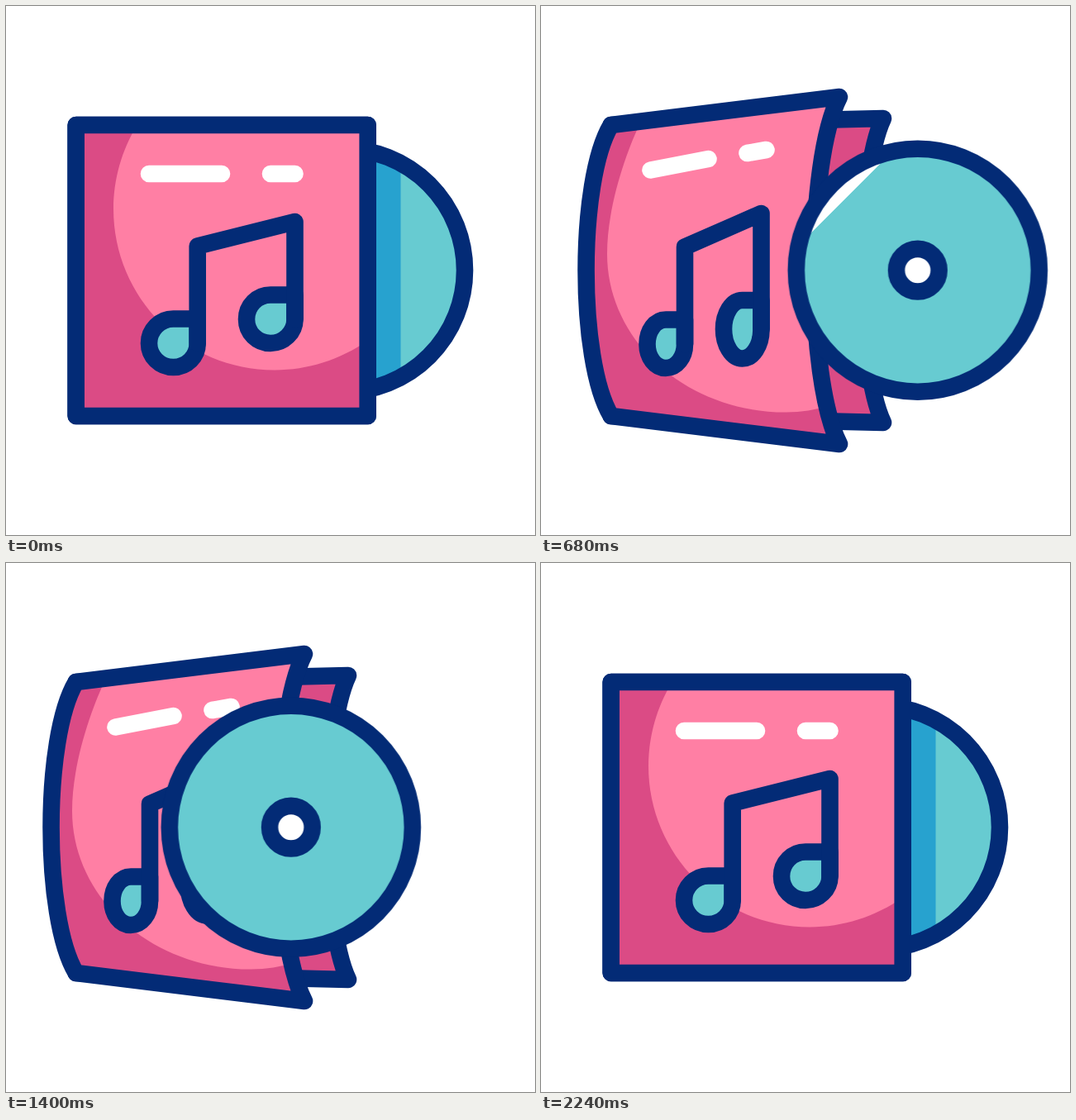
Recreate the animation shown at these times as an HTML page without scripts. Size 640 by 640 pixels, loop 2.4 s.

```html
<!DOCTYPE html>
<html lang="en">
<head>
<meta charset="utf-8">
<title>Album sleeve and disc</title>
<style>
  html, body { margin: 0; height: 100%; overflow: hidden; background: #fff; }
  svg { display: block; width: 100vw; height: 100vh; }

  .line { stroke: #032b76; stroke-width: 20.6; stroke-linecap: round; stroke-linejoin: round; }
  .dark { fill: #db4b85; }
  .light { fill: #ff7fa4; }
  .teal { fill: #67cbd1; }
  .shade { fill: #27a2cf; }
  .white { fill: #fff; }
  .bare { fill: none; }
  .bars { stroke: #fff; }

  .anim { animation: 2400ms cubic-bezier(.333, 0, .667, 1) infinite; }
  .back { animation-name: back; }
  .front { animation-name: front; }
  .glow { animation-name: glow; }
  .bars { animation-name: bars; }
  .stems { animation-name: stems; }
  .heads { animation-name: heads; }
  .disc { animation-name: disc; }
  .shade { animation-name: shade; }
  .shine { animation-name: shine; }
  .inside { animation: inside 2400ms step-end infinite; }
  .outside { animation: outside 2400ms step-end infinite; }

  /* Sleeve: flat, then bent open */
  @keyframes back {
    0%, 92.08%, to { d: path("M84.7 144L437.7 144C437.7 211 437.7 429 437.7 496L84.7 496Z"); }
    23.33%, 70% { d: path("M84.7 144L414 136C381 206 381 434 414 504L84.7 496Z"); }
  }
  @keyframes front {
    0%, 92.08%, to { d: path("M84.7 144L437.7 144C437.7 211 437.7 429 437.7 496L84.7 496C84.7 429 84.7 211 84.7 144Z"); }
    23.33%, 70% { d: path("M84.7 144L361 110C320.3 190 320.3 450 361 530L84.7 496C44.5 429 44.5 211 84.7 144Z"); }
  }
  @keyframes glow {
    0%, 92.08%, to { d: path("M158.5 144C140 174.6 130 209.7 130 245.5C130 353 217 440.5 325 440.5C365 440.5 404.6 428 437.5 404.8C437.5 330 437.5 200 437.5 144Z"); }
    23.33%, 70% { d: path("M121 139.5C105 172 80 240 80 300C80 406 177 491.5 296 491.5C315 491.5 333 488.5 346 484C325 400 322 190 361 110Z"); }
  }
  @keyframes bars {
    0%, 92.08%, to { d: path("M173 203L261 203M320 203L349.5 203"); }
    23.33%, 70% { d: path("M132.5 198.5L202.5 185M249.5 178L272.5 174"); }
  }
  @keyframes stems {
    0%, 92.08%, to { d: path("M231.7 408L231.7 290.5L349.5 261L349.5 379"); }
    23.33%, 70% { d: path("M174 409L174 291.5L266.5 251L266.5 391"); }
  }
  @keyframes heads {
    0%, 92.08%, to { d: path("M231.7 378.5H202.5C186 378.5 173 392 173 408S186 437 202.5 437S231.7 424 231.7 408ZM349.5 349.5H320C304 349.5 291 362.5 291 379S304 408 320 408S349.5 395 349.5 379Z"); }
    23.33%, 70% { d: path("M174 379.5H151C138 379.5 128.5 393 128.5 409S138 438 151 438S174 425 174 409ZM266.5 356H243.5C231 356 221 372 221 391S231 426.5 243.5 426.5S266.5 411 266.5 391Z"); }
  }

  /* Disc slides out, crosses in front, and returns */
  @keyframes disc {
    0%, 4.38%, 93.33%, to { transform: translateX(408px); }
    23.54%, 72.5% { transform: translateX(477.5px); }
    42.5%, 57.42% { transform: translateX(343.2px); }
  }
  @keyframes shade {
    0%, 5.42%, 92.08%, to { transform: translateX(477.5px); }
    23.54%, 70% { transform: translateX(343.5px); }
  }
  @keyframes shine {
    0%, 23.33% { transform: translateX(-267px); }
    50%, to { transform: translateX(148px); }
  }
  @keyframes inside {
    0%, 72.5% { visibility: visible; }
    23.54% { visibility: hidden; }
  }
  @keyframes outside {
    0%, 72.5% { visibility: hidden; }
    23.54% { visibility: visible; }
  }
</style>
</head>
<body>
<svg viewBox="0 0 640 640">
  <defs>
    <clipPath id="moving"><circle class="anim disc" cy="319.7" r="147"/></clipPath>
    <clipPath id="still"><circle cy="319.7" r="147"/></clipPath>
    <circle id="face" class="teal" cy="319.7" r="147"/>
    <g id="rings">
      <circle class="line bare" cy="319.7" r="147"/>
      <circle class="line white" cy="319.7" r="25.8"/>
    </g>
  </defs>

  <path class="anim back line dark"/>

  <g class="inside">
    <use class="anim disc" href="#face"/>
    <g clip-path="url(#moving)"><rect class="anim shade" x="-400" y="150" width="400" height="340"/></g>
    <use class="anim disc" href="#rings"/>
  </g>

  <path class="anim front dark"/>
  <path class="anim glow light"/>
  <path class="anim line bars bare"/>
  <path class="anim heads line teal"/>
  <path class="anim stems line bare"/>
  <path class="anim front line bare"/>

  <g class="outside">
    <g class="anim disc">
      <use href="#face"/>
      <g clip-path="url(#still)">
        <g transform="translate(0 319.7) rotate(45)">
          <path class="anim shine white" d="M0-160H21V160H0ZM64-160H105V160H64Z"/>
        </g>
      </g>
      <use href="#rings"/>
    </g>
  </g>
</svg>
</body>
</html>
```
